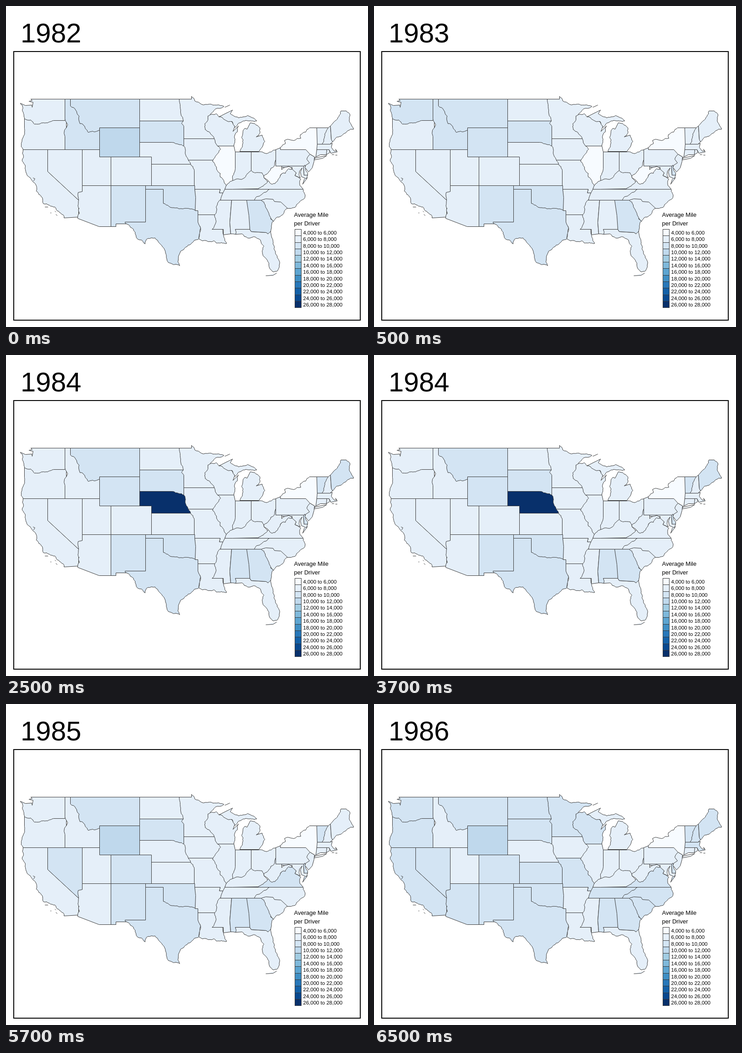
An HTML page with a canvas for the animation above (8000 ms loop, 795 by 705 pixels).

```html
<!DOCTYPE html>
<html lang="en">
<head>
<meta charset="utf-8">
<title>Average miles per driver</title>
<style>
html, body { margin: 0; width: 100%; height: 100%; overflow: hidden; background: #fff; }
canvas { display: block; }
</style>
</head>
<body>
<canvas id="map" width="795" height="705"></canvas>
<script>
const ctx = document.getElementById('map').getContext('2d');
const FONT = 'Arial, "Liberation Sans", sans-serif';
const LINE = '#383838';
const shapes = [];

// Seeded by the end points, so a border looks the same in both directions.
function noise(a, b) {
  const s = Math.sin(a * 12.9898 + b * 78.233) * 43758.5453;
  return s - Math.floor(s) - .5;
}

// Line with midpoint displacement, for rivers and coasts.
function rough(path, x0, y0, x1, y1) {
  const dx = x1 - x0, dy = y1 - y0;
  if (Math.hypot(dx, dy) < 4.5) return path.lineTo(x1, y1);
  const k = noise(x0 + x1, y0 + y1) * .3;
  const mx = (x0 + x1) / 2 - dy * k, my = (y0 + y1) / 2 + dx * k;
  rough(path, x0, y0, mx, my);
  rough(path, mx, my, x1, y1);
}

// M, H, V, L and Z as in SVG; R is a rough line.
function state(id, d) {
  const path = new Path2D();
  let x = 0, y = 0;
  for (const [, cmd, args] of d.matchAll(/([A-Z])([^A-Z]*)/g)) {
    const n = args.trim().split(' ').map(Number);
    if (cmd === 'Z') path.closePath();
    else if (cmd === 'H') path.lineTo(x = n[0], y);
    else if (cmd === 'V') path.lineTo(x, y = n[0]);
    else for (let i = 0; i < n.length; i += 2) {
      const [px, py] = [x, y];
      [x, y] = [n[i], n[i + 1]];
      if (cmd === 'M') path.moveTo(x, y);
      else if (cmd === 'L') path.lineTo(x, y);
      else rough(path, px, py, x, y);
    }
  }
  shapes.push([id, path]);
}

// Painted in this order: a later state covers the loose inner edges of its neighbours.
state('CA', 'M37 315H91V363L159 426V463L127 465R125 458 107 441 82 434 79 420 66 406 67 397 59 386 54 379 43 363 42 353 35 340 38 331 37 315ZM59 377L63 379 60 384M85 441H92M97 454H99M107 450L109 452M109 457L112 460');
state('OR', 'M40 247H132V315H37R33 301 40 268Z');
state('WA', 'M54 204H129V251H104R82 256 62 259 54 250 40 247 38 236 31 213L42 218 56 217 57 222 59 211 50 209 57 207Z');
state('MT', 'M141 204H293V267H205V280H141Z');
state('ID', 'M129 204H141V219R160 241 162 258 168 259 174 269 180 277 198 275 205 272V315H129V286R128 272 135 260 129 247Z');
state('NV', 'M91 315H167V410L159 426 91 363Z');
state('AZ', 'M167 394H230V484H204L157 466R160 444 159 426 158 409L167 407Z');
state('UT', 'M167 315H230V394H167Z');
state('WY', 'M205 267H293V331H205Z');
state('NM', 'M230 394H306V478H241V484H230Z');
state('TX', 'M306 402H345V420H415V449H421V474R427 487 423 511 406 522 383 538 378 553 381 570 356 563 351 545 336 520 327 509 311 510 305 522 288 511 283 496 261 476V474H306Z');
state('MN', 'M376 204H407V198R414 208 446 215 478 220 447 240V270L457 286V291H376Z');
state('ND', 'M293 204H380R382 220 389 252H293Z');
state('IA', 'M385 291H473V338H385Z');
state('SD', 'M293 252H389L385 257 390 263V307H293Z');
state('WI', 'M443 241R461 236 467 243H495V253L502 264 498 275 510 263R501 287 500 307H464R457 291 447 277 437 271 436 258 443 250Z');
state('TN', 'M470 402H578V426H470Z');
state('MS', 'M450 426H495L491 475 493 500 477 502V490H450Z');
state('MO', 'M395 338H460V350L484 386V394L480 402 476 410H468L470 402H413V361L402 350H395Z');
state('KS', 'M319 347H405R410 352 413 361V394H319Z');
state('NE', 'M293 299H364R372 302 385 304 390 307 398 333 405 347H293Z');
state('CO', 'M230 331H319V394H230Z');
state('AR', 'M414 402H470L468 410H476R471 425 461 441 458 458H421V449H415Z');
state('OK', 'M306 394H414V402L416 420 415 448R400 444 388 445 371 443 345 433V402H306Z');
state('LA', 'M421 458H458R460 469 452 490H475R477 502 480 511 484 521 461 520 456 515 423 511 427 487 421 474Z');
state('IN', 'M495 320H538V375L510 384H495Z');
state('IL', 'M464 307H500L503 320V357R497 383 483 394 478 383 470 375 470 367 463 360 453 341 459 330 471 314 464 307Z');
state('OH', 'M538 320H555R574 323 592 315V350L570 374H538Z');
state('FL', 'M503 490H535L538 495 571 497 575 500 581 494R586 517 598 556 596 581 585 583 577 571 564 548 566 527 544 506 530 509 518 500L504 501ZM570 592L586 591 594 586');
state('AL', 'M495 426H535V490H503L505 496 504 501 498 500 493 500 491 475Z');
state('NC', 'M545 426R550 418 566 409 578 402H652R656 420 642 432 626 444H618L603 435H575V426Z');
state('SC', 'M560 426L570 423 586 424 589 429 603 430 618 444R607 458 587 473L560 440Z');
state('GA', 'M528 426H560R574 449 586 472 581 494L575 500 571 497 538 495 535 490 533 460Z');
state('VA', 'M552 402L580 380H595L612 360 618 355 628 358R637 366 634 372 647 380 645 394 652 402ZM662 376L651 391 655 379');
state('MD', 'M605 351H653L654 371H662L659 379 648 374 646 364 650 355 644 362 643 371 646 377 634 372 637 366 628 358V354H605Z');
state('KY', 'M483 394R497 383 513 380 526 374 538 361 546 366 562 366 566 377 574 386 553 401L497 402H480Z');
state('WV', 'M592 337V351H605V359R612 354 620 352 628 358 620 357 613 367 606 367 595 385 584 391 566 377 566 372 588 352 592 337Z');
state('PA', 'M592 315L602 311H667V351H592Z');
state('DE', 'M653 351L656 349 658 361 662 366V371H654Z');
state('NY', 'M602 315V310R613 302 611 295 632 295 647 290 646 282 666 267H686V314H682V327L676 336 677 331 667 325 658 315ZM674 338L680 333 704 328 695 334Z');
state('NJ', 'M667 325L677 331 676 341 672 355 664 364 656 354 658 349 666 344 660 336 662 331Z');
state('NH', 'M690 267H707L712 263 714 293 717 297 711 303H690Z');
state('VT', 'M682 267H707R700 284 694 303H683Z');
state('ME', 'M712 263R722 252 735 230L747 230R754 236 756 257 763 270 740 281 724 289 717 298L714 293Z');
state('MA', 'M683 303H711L716 301 714 310 720 318 726 318 723 314 727 320 713 323 709 315H682ZM715 326H720M723 327H727');
state('CT', 'M682 315H704V326H690L680 331Z');
state('RI', 'M704 315H709L711 321 703 326Z');
state('MI', 'M467 243L489 232 497 228 492 236R504 243 530 240 541 245 550 252 528 251 510 257 502 266 496 253 467 243ZM513 319R520 300 517 288 524 268L529 270 536 256 546 258R557 267 557 279 549 287L562 283R568 297 560 312 555 319ZM480 222L491 217');

// Class index per state; unlisted states fall in class 1.
const years = [
  { 0: 'IL NY WV', 2: 'ID MT SD OK TX NM GA', 3: 'WY' },
  { 0: 'IL NY WV', 2: 'WA ID MT SD WY OK TX NM GA DE' },
  { 0: 'NY', 2: 'MT SD WY NM OK TX AL GA VT ME DE', 11: 'NE' },
  { 0: 'NY', 2: 'MT SD NV CO NM OK TX AL GA VT VA DE', 3: 'WY' },
  { 0: 'NY', 2: 'WA OR CA NV AZ MT ND SD MN WI MO KS CO NM OK TX TN AL GA SC NC VA VT NH ME MA DE', 3: 'WY' }
].map(groups => {
  const classOf = {};
  for (const k in groups) groups[k].split(' ').forEach(id => classOf[id] = +k);
  return classOf;
});

// Twelve steps through a nine-stop blue ramp.
const stops = ['f7fbff', 'deebf7', 'c6dbef', '9ecae1', '6baed6', '4292c6', '2171b5', '08519c', '08306b']
  .map(h => [0, 2, 4].map(i => parseInt(h.slice(i, i + 2), 16)));
const ramp = Array.from({ length: 12 }, (_, i) => {
  const p = i * 8 / 11, k = Math.min(7, Math.floor(p));
  return `rgb(${stops[k].map((c, j) => Math.round(c + (stops[k + 1][j] - c) * (p - k)))})`;
});

function text(str, x, y, size) {
  ctx.font = `${size}px ${FONT}`;
  ctx.fillStyle = '#000';
  ctx.fillText(str, x, y);
}

function drawLegend() {
  text('Average Mile', 632.5, 463, 13);
  text('per Driver', 632.5, 482, 13);
  const step = 14.36;
  ctx.strokeStyle = LINE;
  ctx.lineWidth = 1;
  ramp.forEach((color, i) => {
    const top = Math.round(490 + i * step);
    const h = Math.round(490 + (i + 1) * step) - top;
    ctx.fillStyle = color;
    ctx.fillRect(634.5, top + .5, 14, h);
    ctx.strokeRect(634.5, top + .5, 14, h);
    const from = 4 + 2 * i;
    text(`${from},000 to ${from + 2},000`, 652.5, 502 + i * step, 11.5);
  });
}

function drawMap(classOf) {
  ctx.save();
  ctx.translate(.5, .5);
  ctx.lineJoin = 'round';
  ctx.lineWidth = 1;
  ctx.strokeStyle = LINE;
  for (const [id, path] of shapes) {
    ctx.fillStyle = ramp[classOf[id] ?? 1];
    ctx.fill(path);
    ctx.stroke(path);
  }
  ctx.restore();
}

function draw(index) {
  ctx.fillStyle = '#fff';
  ctx.fillRect(0, 0, 795, 705);
  text(1982 + index, 32, 80, 60);
  ctx.strokeStyle = '#000';
  ctx.lineWidth = 2;
  ctx.lineJoin = 'miter';
  ctx.strokeRect(17, 100, 761, 590);
  drawMap(years[index]);
  drawLegend();
}

let shown = -1;
function tick() {
  const t = performance.now() % 8000;
  const index = Math.floor((t + 1500) / 2000);
  if (index !== shown) draw(shown = index);
  requestAnimationFrame(tick);
}
tick();
</script>
</body>
</html>
```
